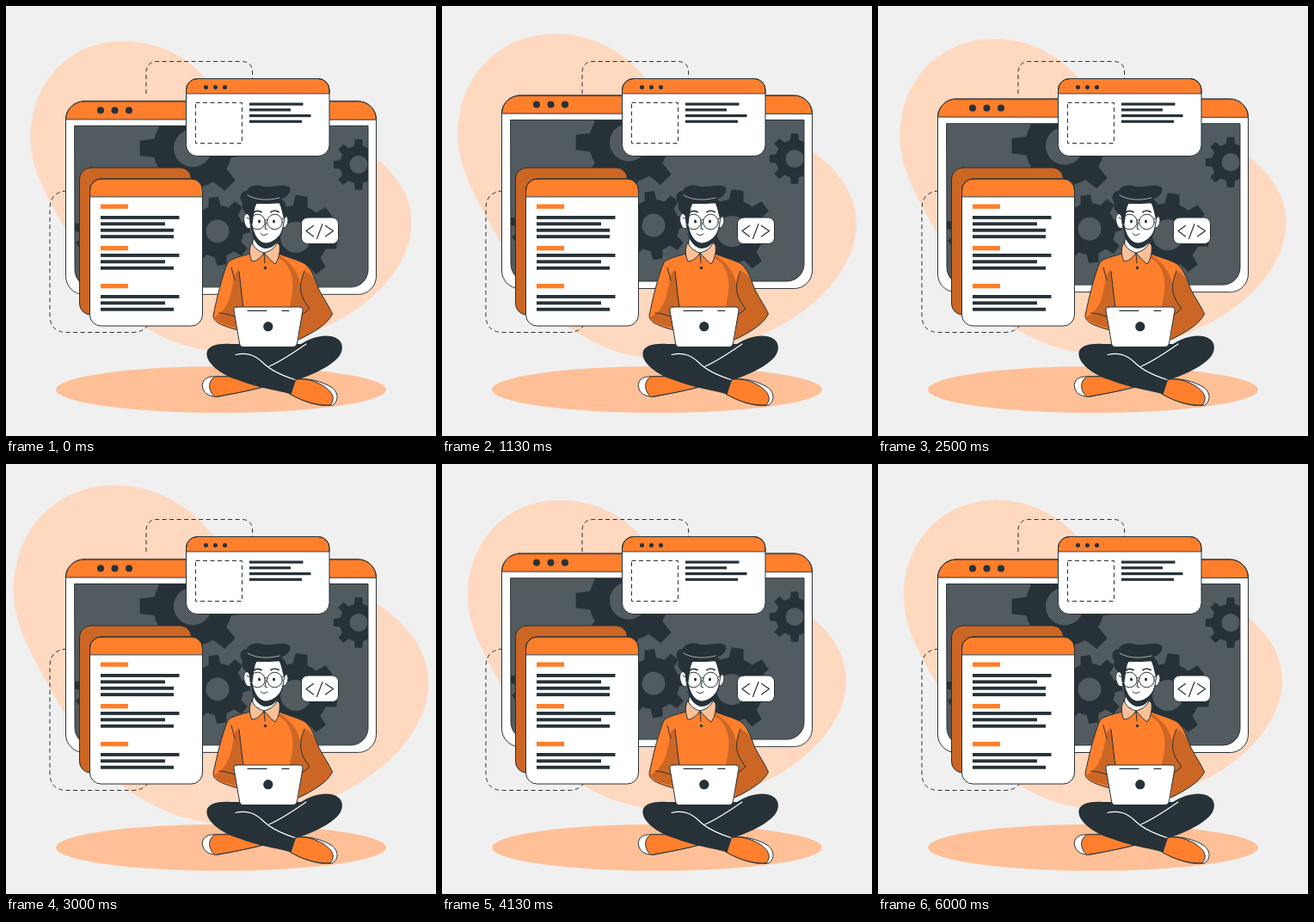
Write an HTML page that moves like this. It is 500 by 500 pixels and loops after 6.04 s.

```html
<!DOCTYPE html>
<html lang="en">
<head>
<meta charset="utf-8">
<title>Developer at work</title>
<style>
  html, body { margin: 0; width: 100%; height: 100%; overflow: hidden; background: #f0f0f0; }
  svg { display: block; width: 100%; height: 100%; }
  .o { fill: #ff7f2d; }
  .d { fill: #cc6624; }
  .k { fill: #263238; }
  .w { fill: #fff; }
  .p { fill: #ffc098; }
  .g { fill: #525b60; }
  .n { fill: none; }
  .s { stroke: #263238; stroke-width: 1; stroke-linejoin: round; stroke-linecap: round; }
  .dash { fill: none; stroke: #263238; stroke-width: 1; stroke-dasharray: 5 3.5; }
  .white { fill: none; stroke: #fff; stroke-width: 1.1; stroke-linecap: round; }
  #blob { fill: #ffd8c0; transform-box: view-box; transform-origin: 250px 221.5px; }
</style>
</head>
<body>
<svg viewBox="0 0 500 500">
  <defs>
    <clipPath id="screen"><path d="M80 139.5H421V307A20 20 0 0 1 401 327H100A20 20 0 0 1 80 307Z"/></clipPath>
  </defs>

  <path id="blob" d="M30 155C30 86 78 42 137 42C180 42 213 62 234 87C266 126 350 130 400 158C445 183 470 215 470 252C470 298 428 346 372 371C330 392 285 402 245 400.500C215 398 190 389 165 374C130 355 101 315 76 270C54 230 30 193 30 155Z"/>
  <ellipse class="p" cx="250" cy="446" rx="192" ry="27"/>
  <path class="dash" d="M163 102V78Q163 64.500 176 64.500H274Q286.500 64.500 286.500 77V85"/>
  <path class="dash" d="M71 215Q51 216 51 236V359Q51 379.500 71 379.500H148Q160 379 165 371"/>

  <g id="monitor">
    <rect class="w" x="69.500" y="111" width="361" height="224.500" rx="21"/>
    <path class="o s" d="M69.500 132V132A21 21 0 0 1 90.500 111H409.500A21 21 0 0 1 430.500 132Z"/>
    <rect class="n s" x="69.500" y="111" width="361" height="224.500" rx="21"/>
    <g class="k"><circle cx="110" cy="121.500" r="4"/><circle cx="126.500" cy="121.500" r="4"/><circle cx="143" cy="121.500" r="4"/></g>
    <g clip-path="url(#screen)"><rect class="g" x="80" y="139" width="341" height="189"/><g id="gears"></g></g>
    <path class="n s" d="M80 139.500H421V307A20 20 0 0 1 401 327H100A20 20 0 0 1 80 307Z"/>
  </g>

  <g id="preview">
    <rect class="w" x="209.500" y="84.500" width="166.500" height="90" rx="13"/>
    <path class="o s" d="M209.500 101.500V97.500A13 13 0 0 1 222.500 84.500H363A13 13 0 0 1 376 97.500V101.500Z"/>
    <rect class="n s" x="209.500" y="84.500" width="166.500" height="90" rx="13"/>
    <g class="k"><circle cx="232.500" cy="94.500" r="2.500"/><circle cx="243.500" cy="94.500" r="2.500"/><circle cx="254.500" cy="94.500" r="2.500"/></g>
    <rect class="dash" x="220.500" y="112.500" width="54" height="47"/>
  </g>

  <g id="page">
    <rect class="d s" x="85.500" y="188" width="130" height="171" rx="13"/>
    <rect class="w" x="97.500" y="201" width="131" height="171" rx="13"/>
    <path class="o s" d="M97.500 221.500V214A13 13 0 0 1 110.500 201H215.500A13 13 0 0 1 228.500 214V221.500Z"/>
    <rect class="n s" x="97.500" y="201" width="131" height="171" rx="13"/>
  </g>

  <g id="badge" class="s">
    <rect class="w" x="343.500" y="246" width="43" height="30.500" rx="7"/>
    <path class="n" style="stroke-width:1.200" d="M357.500 255.500L349 261.500L357.500 268M368 253.500L361.500 270.500M371.500 255.500L380.500 261.500L371.500 268"/>
  </g>

  <g id="legs">
    <path class="w s" d="M243 431C233 430 227 436 228.500 443C230 452 239 455 248 454C262 451 280 448 299 443L270 431Z"/>
    <path class="o s" d="M243 431C235 435 234 447 243 454.500C258 452 280 448 299 443L270 431Z"/>
    <path class="w s" d="M337 434C352 432 368 437 378 443C387 449 387 459 380 464C366 467 345 460 330 451Z"/>
    <path class="o s" d="M337 434C352 433 360 437 366 440C377 446 385 455 377 464C362 465 345 460 330 451Z"/>
    <path class="k" d="M233.500 403C235 394 248 392 262 393H343C354 386 367 382 378 384C393 387 394 400 386 409C376 420 354 430 337 435L331.500 451.500C312 446 292 444 270 435C250 429 232 415 233.500 403Z"/>
    <path class="white" d="M267 405.500C282 402 291 407 299 415C309 425 322 430 336 434.500M349 393C336 402 322 412 306 419"/>
  </g>

  <g id="body">
    <path class="o" d="M284 288C274 291 263 293 258 298C251 315 245 340 241 360C241 368 252 372 270 377L274 388H340C357 380 374 370 379.500 358C375 348 369 340 364 330C359 318 357 308 348 300C339 295 330 293 317 288Z"/>
    <path class="d" d="M271 306C273 324 274 338 276 350L266 352L268 374C255 371 246 369 242 362C250 358 257 349 260 340C263 329 265 319 266 312Z"/>
    <path class="d" d="M316 293C327 297 333 310 333.500 324C333.500 335 331 342 330 350H343L341 388C357 380 374 370 379.500 358C375 348 369 340 364 330C359 318 357 308 347 306C344 300 333 296 318 290Z"/>
    <path class="o" d="M318 290C330 293 339 295 348 300C354 306 356 312 359 319C355 312 350 308 347 309C345 314 343 320 342.500 326C341 310 331 298 318 290Z"/>
    <path class="n s" d="M284 288C274 291 263 293 258 298C251 315 245 340 241 360C241 368 252 372 270 377M340 388C357 380 374 370 379.500 358C375 348 369 340 364 330C359 318 357 308 348 300C339 295 330 293 317 288"/>
    <path class="n s" d="M262 304L266 319M271 309C273 325 274 338 276 350M347 308C342 321 341 329 345 339C347 344 350 348 353 352L342 361M248 357C255 357 262 360 266 361"/>
    <path class="w s" d="M288 266L286 282L300 289L315 281L317 262Z"/>
    <path class="p s" d="M286 275C282 281 283 291 286 297C291 297 296 293 300 287C304 292 309 297 313 300C317 295 319 286 318 278L315 275C313 281 308 285 300 287C293 285 288 281 286 275Z"/>
    <path class="n s" d="M300 287L301 299"/>
    <circle class="k" cx="301.500" cy="304.500" r="1.700"/>
  </g>

  <g id="head">
    <path class="w s" d="M323 245C328 242 329 249 327 254C325 258 323 259 322 257Z"/>
    <path class="w s" d="M283 230C281 247 283 261 287 268C293 281 309 282 316 271C322 264 325 248 324 229Z"/>
    <path class="w s" d="M283 242C278 239 275 246 277.500 253C279 258 282 260 285 258Z"/>
    <path class="k" d="M284 255C286 269 291 281 302 282C312 282 319 272 323 257C319 268 311 275 302 275.500C294 275 289 267 286.500 255Z"/>
    <path class="k" d="M286 257L282 243C276 240 273 234 275 229C270 223 273 215 280 215C282 209 292 207 300 210C311 211 323 206 330 211C332 217 327 222 320 224.500C325 228 327 234 326 241L323.500 248C321 242 321 235 317 228C307 231 297 230 292 229C288 234 288 247 286 257Z"/>
    <path class="white" style="stroke-width:.6" d="M281 220C289 225 303 227 318 223"/>
    <g class="n s"><circle cx="292.500" cy="251" r="8.800"/><circle cx="312.500" cy="251" r="8.800"/><path d="M301 249Q302.500 247.500 304 249M321 248L326 245M284 248L280 246M302.500 252L301 259L303.500 259.500M296 264.500Q299 268.500 304 265"/></g>
    <path class="n s" style="stroke-width:1.700" d="M288 240Q292 237 297 239.500M308 239.500Q313 236.500 317 239.500"/>
    <ellipse class="k" cx="294.500" cy="250.500" rx="1.500" ry="2"/><ellipse class="k" cx="311.500" cy="250.500" rx="1.500" ry="2"/>
  </g>

  <g id="laptop">
    <path class="w s" d="M268 350H341Q345.500 350 345 354L338.500 392Q337.500 396.500 333 396.500H276Q272 396.500 271.500 392L265 354Q264.500 350 268 350Z"/>
    <path class="n s" style="stroke-width:1.300" d="M281 354.300H303M321 354.300H329"/>
    <circle class="k" cx="304.800" cy="372.700" r="5.600"/>
  </g>
</svg>
<script>
  const NS = 'http://www.w3.org/2000/svg';
  const byId = id => document.getElementById(id);

  function add(parent, tag, attrs) {
    const el = document.createElementNS(NS, tag);
    for (const key in attrs) el.setAttribute(key, attrs[key]);
    byId(parent).append(el);
  }

  function addGear(x, y, body, outer, hole, teeth, turn) {
    const step = 2 * Math.PI / teeth;
    const points = [];
    for (let i = 0; i < teeth; i++) {
      const mid = turn * Math.PI / 180 + i * step;
      for (const [r, a] of [[body, -.3], [outer, -.18], [outer, .18], [body, .3], [body, .5]]) {
        const angle = mid + a * step;
        points.push(`${(x + r * Math.cos(angle)).toFixed(2)} ${(y + r * Math.sin(angle)).toFixed(2)}`);
      }
    }
    add('gears', 'path', { class: 'k', d: `M${points.join('L')}Z` });
    add('gears', 'circle', { class: 'g', cx: x, cy: y, r: hole });
  }

  // x, y, body radius, tooth radius, hole radius, teeth, turn
  [
    [217, 165.5, 46, 62, 22, 8, 0],
    [410, 184.5, 22, 29.5, 10.5, 8, 0],
    [246, 262, 30, 40, 13.5, 8, -7],
    [337, 269, 37, 49, 18, 8, 8],
    [108, 262, 22, 30, 8, 8, 10]
  ].forEach(gear => addGear(...gear));

  const bar = (parent, cls, x, y, width, height) => add(parent, 'rect', { class: cls, x, y, width, height });

  [[112.5, 62.5], [119.2, 48], [126, 71.5], [132.7, 61]].forEach(([y, w]) => bar('preview', 'k', 283, y, w, 3.2));

  const widths = [91.5, 75, 85, 85];
  [[230.5, 244, 4], [279, 288, 3], [323, 336, 3]].forEach(([title, top, count]) => {
    bar('page', 'o', 110, title, 32, 5.3);
    for (let i = 0; i < count; i++) bar('page', 'k', 110, top + i * 7.4, widths[i], 3.9);
  });

  const LOOP = 6040;
  const pulse = [[0, 1], [.1, 1.1], [.3, 1], [.4, 1], [.5, 1.1], [.6, 1], [1, 1]];
  const drift = [[0, 0], [.5, -9], [1, 0]];

  function play(id, frames, duration) {
    byId(id).animate(frames, { duration, delay: -40, iterations: Infinity, easing: 'linear' });
  }
  play('blob', pulse.map(([offset, s]) => ({ offset, transform: `scale(${s})` })), LOOP);
  play('monitor', drift.map(([offset, y]) => ({ offset, transform: `translateY(${y}px)` })), LOOP / 2);
</script>
</body>
</html>
```
